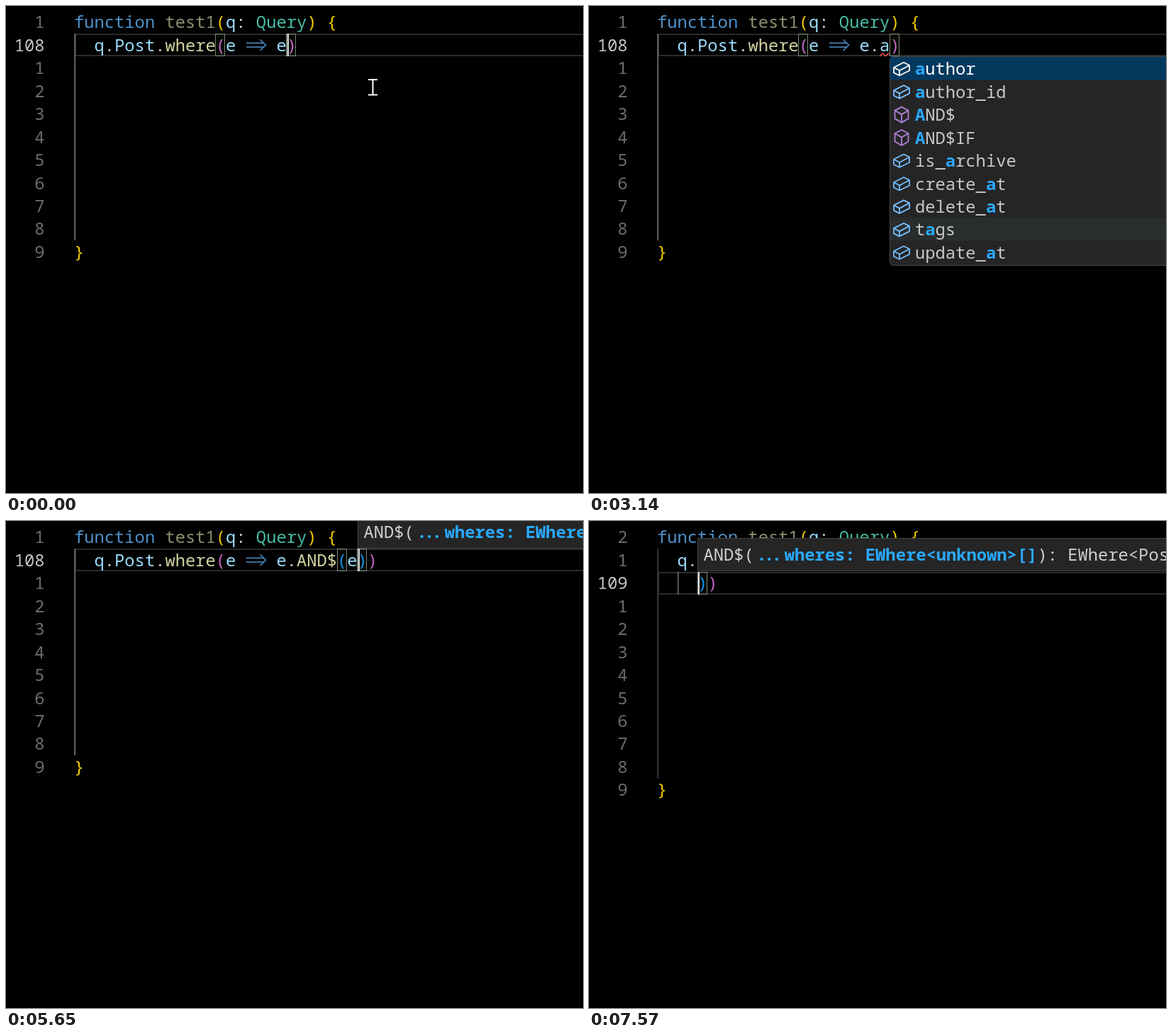
Animation, 814 px wide and 688 px high, one loop 8000 ms. Source, as an HTML page with a canvas:

```html
<!DOCTYPE html>
<html lang="en">
<head>
<meta charset="utf-8">
<title>Typed query builder</title>
<style>
html, body { margin: 0; height: 100%; overflow: hidden; background: #000; }
canvas { display: block; }
</style>
</head>
<body>
<canvas id="stage" width="814" height="688"></canvas>
<script>
const g = document.getElementById('stage').getContext('2d');
const CW = 14.27, RH = 32.45, LEFT = 96, LOOP = 8000;
const BLUE = '#4f92cb', VAR = '#9cdcfe', FN = '#d2d2a2', FG = '#d0d0d0',
  GOLD = '#f0ca00', PINK = '#c864c4', SKY = '#1790ea', MATCH = '#2aaaff';

const colX = c => LEFT + c * CW;
const rowY = r => 6.6 + r * RH;

function rect(x, y, w, h, color) {
  g.fillStyle = color;
  g.fillRect(x, y, w, h);
}
function frame(x, y, w, h, color) {
  g.strokeStyle = color;
  g.lineWidth = 1;
  g.strokeRect(Math.round(x) + .5, Math.round(y) + .5, Math.round(w), Math.round(h));
}
function path(points, color, width, close) {
  g.beginPath();
  points.forEach(([x, y]) => g.lineTo(x, y));
  if (close) g.closePath();
  g.strokeStyle = color;
  g.lineWidth = width;
  g.stroke();
}
function disc(x, y, r, color) {
  g.fillStyle = color;
  g.beginPath();
  g.arc(x, y, r, 0, 7);
  g.fill();
}
// One glyph per cell, runs are [text, color, weight]
function put(x, base, runs) {
  for (const [text, color, weight = 200] of runs) {
    g.font = weight + ' 23.8px "Noto Sans Mono", "DejaVu Sans Mono", monospace';
    g.fillStyle = color;
    for (const ch of text) {
      if (ch !== ' ') g.fillText(ch, x, base);
      x += CW;
    }
  }
}
const code = (row, col, runs) => put(colX(col), rowY(row) + 24.6, runs);

// Value of the last step whose time has come
const at = (t, steps) => steps.filter(s => s[0] <= t).pop()[1];

const ENTER = 6970;
const body = [[0, 'e'], [1860, 'e.'], [2610, 'e.a'], [3400, 'e.an'], [3530, 'e.and'],
  [4060, 'e.AND$'], [4850, 'e.AND$('], [5650, 'e.AND$(e'], [6640, 'e.AND$(']];
const blink = [[0, 1], [410, 0], [870, 1], [1400, 0], [1860, 1], [2390, 0], [2610, 1],
  [3140, 0], [3400, 1], [4590, 0], [4850, 1], [5320, 0], [5650, 1], [6180, 0], [6640, 1]];

const methods = 'AND$ AND$IF IF$ NOT$ OR$ OR$IF'.split(' ');
const lists = {
  all: [...methods, ...'author author_id click_count comment content create_at'.split(' ')],
  a: 'author author_id AND$ AND$IF is_archive create_at delete_at tags update_at'.split(' '),
  an: ['AND$', 'AND$IF'],
  e: 'e else encodeURI encodeURIComponent enum escape eval export extends Element Error Event'.split(' ')
};
const popups = [[0, null], [1860, ['all', '']], [2610, ['a', 'a']], [3400, ['an', 'an']],
  [3530, ['an', 'and']], [4060, null], [5720, ['e', 'e']], [6510, null]];

function icon(x, y, cube, color) {
  const move = pts => pts.map(([a, b]) => [x + a, y + b]);
  const [outer, ridge, edge] = cube
    ? [[[0, -11], [9.5, -6], [9.5, 5.5], [0, 11], [-9.5, 5.5], [-9.5, -6]],
       [[-9.5, -6], [0, -.5], [9.5, -6]], [[0, -.5], [0, 11]]]
    : [[[-11, -2], [3, -9], [11, -5], [11, 2.5], [-3, 9.5], [-11, 5.5]],
       [[-11, -2], [-3, 2.5], [11, -5]], [[-3, 2.5], [-3, 9.5]]];
  g.lineJoin = 'round';
  path(move(outer), color, 1.8, true);
  path(move(ridge), color, 1.8);
  path(move(edge), color, 1.8);
}

function suggest(x, [name, typed]) {
  const items = lists[name], top = 72;
  const h = items.length * RH + 3;
  g.beginPath();
  g.roundRect(x + .5, top - .5, 500, h, 5);
  g.fillStyle = '#252526';
  g.fill();
  g.strokeStyle = '#454545';
  g.lineWidth = 1;
  g.stroke();
  items.forEach((item, i) => {
    const y = top + i * RH, first = i === 0;
    if (first) rect(x + 1, y, 500, RH, '#04395e');
    if (name === 'a' && i === 7) rect(x + 1, y, 500, RH, '#2a2d2e');
    const cube = methods.includes(item);
    icon(x + 17, y + 16.7, cube, first ? '#fff' : cube ? '#b180d7' : '#75beff');
    const tone = first ? '#fff' : '#c8c8c8';
    const low = item.toLowerCase();
    const k = low.includes('_' + typed) ? low.indexOf('_' + typed) + 1 : low.indexOf(typed);
    const from = low.startsWith(typed) ? 0 : k, to = from + typed.length;
    put(x + 36, y + 25.3, [[item.slice(0, from), tone],
      [item.slice(from, to), MATCH, 700], [item.slice(to), tone]]);
  });
}

function signature(x, top) {
  rect(x, top, 814 - x, 47, '#252526');
  frame(x, top, 900, 46, '#454545');
  const tx = x + 8.5, base = top + 32;
  put(tx, base, [['AND$(', FG, 500], ['   ', FG],
    ['wheres: EWhere<unknown>[]', MATCH, 700], ['): EWhere<Post>', FG, 500]]);
  for (const c of [5.25, 6, 6.75]) put(tx + c * CW, base, [['.', MATCH, 700]]);
}

function squiggle(from, cols) {
  const pts = [], x0 = colX(from);
  for (let x = 0; x <= cols * CW; x++) pts.push([x0 + x, 68.8 + 1.8 * Math.cos(x * Math.PI / 4.2)]);
  path(pts, '#f14c4c', 1.5);
}

function bulb() {
  disc(109, 16, 8, '#75beff');
  rect(105, 22, 8, 6, '#75beff');
  disc(116, 26, 6.6, '#000');
  disc(116, 26, 5, '#75beff');
  disc(116, 26, 2, '#000');
}

function mouse() {
  const x = 517.5;
  path([[x, 105], [x, 125]], '#fff', 2);
  for (const y of [104, 125.5]) path([[x - 6.5, y], [x + 6.5, y]], '#fff', 2);
}

function bracketBox(row, col) {
  rect(colX(col), rowY(row), 13, RH, 'rgba(0,100,0,.1)');
  frame(colX(col) - .5, rowY(row), 13, 31, '#7c8474');
}

function draw(t) {
  const split = t >= ENTER;
  const text = at(t, body);
  const called = text.includes('(');
  const caret = split ? 4 : 20 + text.length;
  const row = split ? 2 : 1;
  rect(0, 0, 814, 688, '#000');

  // Current line, indent guides and gutter
  const y = Math.round(rowY(row));
  rect(97, y, 717, 2, '#2b2b2b');
  rect(97, y + 30, 717, 2, '#2b2b2b');
  rect(97, y, 2, 32, '#2b2b2b');
  const last = split ? 11 : 10;
  rect(96.3, rowY(1), 1.7, rowY(last) - rowY(1), t >= 7500 ? '#404040' : '#707070');
  if (split) rect(125, rowY(2), 1.5, RH, t >= 7500 ? '#707070' : '#404040');
  for (let r = 0; r <= last; r++) {
    const n = String(r === row ? 107 + row : Math.abs(r - row));
    put(54.6 - n.length * CW, rowY(r) + 24.8, [[n, r === row ? '#c6c6c6' : '#6c6c6c']]);
  }

  // Occurrences of the symbol under the caret
  if (t >= 140 && t < 1860 || t >= 5920 && t < 6510) {
    rect(colX(15), 39, CW, 32, 'rgba(0,73,114,.72)');
    rect(colX(20), 39, CW, 32, 'rgba(87,87,87,.72)');
    if (called) rect(colX(27), 39, CW, 32, 'rgba(87,87,87,.72)');
  }
  if (called) {
    if (!split) bracketBox(1, 26);
  } else bracketBox(1, 14);
  bracketBox(row, caret);

  const broken = t >= 2190 && t < 3010;
  code(0, 0, [['function ', BLUE], ['test1', broken ? FN : '#8f8f70'], ['(', GOLD],
    ['q', VAR], [': ', FG], ['Query', '#48bca4'], [') {', GOLD]]);
  code(last, 0, [['}', GOLD]]);

  const member = text.slice(2).split('(')[0];
  const tone = member !== 'AND$' ? VAR : t < 4460 ? '#4fc1ff' : FN;
  const runs = [['q', VAR], ['.', FG], ['Post', VAR], ['.', FG], ['where', FN], ['(', PINK],
    ['e    ', VAR], ['e', VAR], [text.slice(1, 2), FG], [member, tone]];
  if (called) runs.push(['(', SKY], [text.split('(')[1], VAR]);
  const closers = called ? [[')', SKY], [')', PINK]] : [[')', PINK]];
  code(1, 2, split ? runs : [...runs, ...closers]);
  if (split) code(2, 4, closers);

  // Arrow ligature
  path([[339, 52.3], [363, 52.3]], BLUE, 1.5);
  path([[339, 58], [363, 58]], BLUE, 1.5);
  path([[358.5, 47.5], [366.5, 55.2], [358.5, 63]], BLUE, 1.5);

  if (t >= 2190 && t < 2610) squiggle(22, 1);
  if (t >= 3140 && t < 3930) squiggle(22, 1);
  if (t >= 3930 && t < 4390) squiggle(22, 3);
  if (t >= 4190 && t < 4590) bulb();
  if (t < 70) mouse();

  if (t >= 4990 && !split) signature(Math.round(colX(caret)), -8);
  if (t >= 7500) signature(153, 24);
  const popup = at(t, popups);
  if (popup) suggest(Math.round(colX(caret)), popup);
  if (at(t, blink)) rect(Math.round(colX(caret)) + .5, y, 2.5, 32, '#d8d8d8');
}

function tick() {
  draw(performance.now() % LOOP);
  requestAnimationFrame(tick);
}
tick();
</script>
</body>
</html>
```
